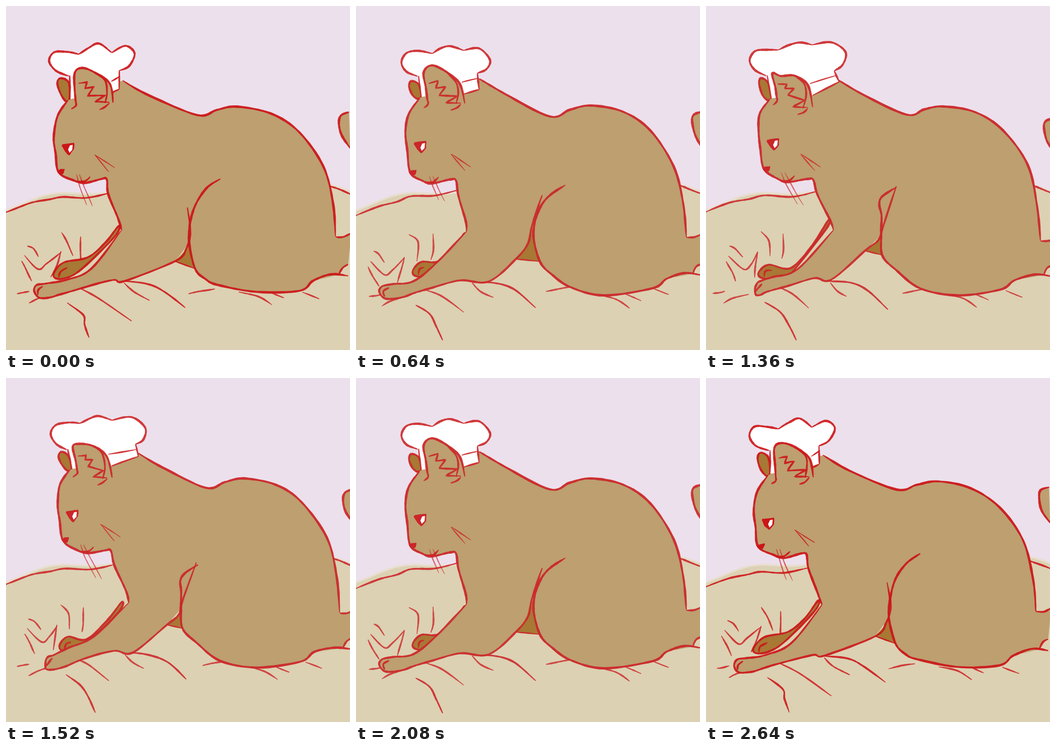
An HTML page for the animation above (2720 ms loop, 748x748 px).

```html
<!DOCTYPE html>
<html lang="en">
<head>
<meta charset="utf-8">
<title>Kneading cat</title>
<style>
html, body { margin: 0; width: 100%; height: 100%; overflow: hidden; background: #ece0ec; }
svg { display: block; width: 100%; height: 100%; }
</style>
</head>
<body>
<svg id="stage" viewBox="0 0 748 748">
  <path fill="#dcd1b3" stroke="#e8decf" stroke-width="4" d="M-5 446C45 430 75 405 130 406C160 408 190 411 222 405L690 386Q725 392 755 406V755H-5Z"/>
  <g id="art"></g>
</svg>
<script>
const STEP = 80, COUNT = 34, HALF = 17;
const FUR = '#bd9f70', DARK = '#a87835', WHITE = '#fff';

// Resting drawing: each part belongs to a group that bends together
const parts = {}, pins = {};
function part(group, name, text) {
  const n = text.split(' ').map(Number), pts = [];
  for (let i = 0; i < n.length; i += 2) pts.push([n[i], n[i + 1]]);
  parts[name] = { group, pts };
}
// A pin: its resting place, then its shift when leaning, rising and pulling
function pin(group, x, y, ...shift) {
  (pins[group] ||= []).push({ x, y, shift });
}

part('body', 'back', '268 158 325 192 422 240 465 226 510 216 580 230 640 270 690 348 712 430 718 502');
part('body', 'tailTop', '718 503 735 503 752 495');
part('body', 'tailUnder', '752 560 740 567 732 582');
part('body', 'tailTip', '753 229 735 236 731 252 737 280 753 308');
part('body', 'seat', '752 585 715 581 675 593 645 614 540 629 465 611 425 583 400 556 387 510 389 470 402 435 425 409 455 389');
pin('body', 268, 158, -14, 4, 18, 2, 18, 2);
pin('body', 422, 240, -7, -3, 8, -3, 15, -4);
pin('body', 510, 216, -6, 3, 15, -1, 5, 2);
pin('body', 640, 270, -2, 5, 0, -3, 6, 0);
pin('body', 690, 348, 0, 0, 7, -3, 9, -3);
pin('body', 718, 502, -1, -1, 7, 4, 9, 8);
pin('body', 740, 567, -8, 2, 0, 3, 2, 3);
pin('body', 735, 250, -7, 2, 0, 8, 4, 14);
pin('body', 645, 614, -7, 5, -5, -2, -5, 3);
pin('body', 540, 629, 5, -7, 5, -2, 10, 0);
pin('body', 465, 611, -5, -5, 3, 1, 0, 3);
pin('body', 400, 556, 12, 16, -14, -12, -17, -14);
pin('body', 387, 510, 11, 5, -8, -8, -6, -12);
pin('body', 455, 389, 11, -13, -33, 25, -42, 5);

part('leg', 'leg', '405 411 382 480 373 518 348 550 288 599 225 597 160 614 125 625 100 633 65 637 51 622 57 609 80 605 125 598 178 556 240 490');
part('leg', 'toe', '62 632 60 620 72 612');
pin('leg', 405, 411, -11, 27, 8, -5, 9, -19);
pin('leg', 380, 480, 19, 12, 2, 2, 3, 0);
pin('leg', 348, 550, 20, 5, 7, -13, -2, -18);
pin('leg', 288, 599, -30, -1, -7, -5, -16, -4);
pin('leg', 225, 597, 7, -1, 10, -6, 10, -5);
pin('leg', 125, 625, -7, 2, -3, 5, 7, -3);
pin('leg', 65, 637, 7, -3, 3, -3, 43, -9);
pin('leg', 51, 622, 10, -2, 13, 0, 56, -8);
pin('leg', 125, 598, 5, -2, 5, -18, 20, -9);
pin('leg', 178, 556, 7, 15, 4, -9, 22, 16);
pin('leg', 240, 490, 12, -3, 18, -4, 37, -3);

part('head', 'front', '240 490 238 465 222 410 217 379 205 377 167 386 145 380 118 363 112 315 107 275 115 235 138 200');
part('head', 'hatL', '134 153 110 143 99 122 110 102 138 98 166 103');
part('head', 'hatM', '166 103 185 92 205 87 234 97');
part('head', 'hatR', '234 97 268 92 291 117 283 138 264 146');
part('head', 'bandSide', '264 146 268 182');
part('head', 'bandLow', '268 182 234 191');
part('head', 'bandMid', '266 157 230 166');
part('head', 'bandLeft', '142 197 136 152');
part('head', 'ear', '157 212 152 180 147 145 165 129 195 142 226 170 237 212');
part('head', 'earInner', '195 142 217 165 222 190 218 213');
part('head', 'earZig', '158 168 178 163 174 178 194 176 181 194 220 196 196 210 228 211');
part('head', 'earCurl', '206 227 218 222 228 213');
part('head', 'earBase', '158 207 156 215 147 221');
part('head', 'farEar', '121 163 115 175 122 192 134 202 142 195 136 170');
part('head', 'eye', '127 298 152 295 151 308 142 319 134 311');
part('head', 'glint', '144 299 150 298 149 309 143 315 140 308');
part('head', 'nose', '116 361 122 358 131 357 128 366 121 368');
part('head', 'mouth', '150 383 168 382 180 372');
pin('head', 99, 122, -5, -2, 1, 0, -4, -4);
pin('head', 166, 103, -8, 2, -2, -5, -8, -8);
pin('head', 205, 87, -2, -5, -5, -4, 0, -8);
pin('head', 234, 97, -4, 4, -4, -3, -3, -12);
pin('head', 291, 117, -11, -14, 12, -5, 12, -17);
pin('head', 265, 146, -18, -5, 20, -2, 15, -5);
pin('head', 268, 182, -22, -1, 18, -10, 22, -17);
pin('head', 134, 153, 3, -1, 0, 2, -3, -1);
pin('head', 165, 129, 0, 6, -10, 2, -3, 23);
pin('head', 226, 170, -1, -2, -11, -7, -4, 3);
pin('head', 157, 212, -5, 3, -2, -9, -2, -7);
pin('head', 215, 210, -3, -2, -9, -2, -7, 10);
pin('head', 119, 172, -3, -7, -1, -4, 0, -7);
pin('head', 138, 200, -3, 5, 2, -8, 0, 3);
pin('head', 107, 275, -3, 8, 4, -10, 7, 0);
pin('head', 140, 307, -5, 4, 2, -12, 6, -6);
pin('head', 118, 362, -4, -2, 3, -16, 8, -8);
pin('head', 167, 386, 3, -1, 8, -11, 13, -3);
pin('head', 217, 379, 2, -1, 6, -8, 16, -1);
pin('head', 232, 440, -1, 0, 13, -2, 23, -3);
pin('head', 240, 490, 12, -3, 18, -4, 37, -3);

part('hair', 'whiskerA', '160 370 168 395 180 422');
part('hair', 'whiskerB', '167 370 178 395 193 424');
part('hair', 'cheekA', '207 322 250 350');
part('hair', 'cheekB', '207 322 237 358');
pin('hair', 163, 370, -7, -4, 0, -12, 4, -8);
pin('hair', 187, 423, -5, 11, 11, 13, 19, 9);
pin('hair', 220, 333, -14, 2, -2, -12, -1, 0);

part('far', 'farArm', '150 588 128 587 124 575 142 556 178 556 212 528 236 494 230 515 170 578');
part('far', 'farToe', '135 585 138 573 148 568');
pin('far', 124, 575, -20, 5, -6, 2, -9, 4);
pin('far', 178, 556, 0, -10, -15, 6, 7, 14);
pin('far', 236, 494, 8, -16, 0, 10, 30, -28);

part('bed', 'bedLeft', '-4 457 50 436 90 425 120 414 170 412 220 401');
part('bed', 'bedRight', '703 390 725 398 752 409');
part('bed', 'fold1', '245 598 300 602 345 617 391 656');
part('bed', 'fold2', '252 602 270 620 299 634');
part('bed', 'fold3', '150 617 185 630 234 666');
part('bed', 'fold4', '130 650 160 670 175 697 188 727');
part('bed', 'stubA', '56 652 75 642 100 634');
part('bed', 'stubB', '28 632 42 630 55 627');
part('bed', 'wrink1', '26 567 38 590 50 610');
part('bed', 'wrink2', '32 555 62 585 80 573 105 548');
part('bed', 'wrink3', '105 546 98 575 90 602');
part('bed', 'wrink4', '115 497 135 512 132 555');
part('bed', 'wrink5', '168 495 168 530 163 552');
part('bed', 'wrink6', '38 533 50 540 62 558');
part('bed', 'right1', '413 621 440 615 468 611');
part('bed', 'right2', '520 625 565 638 595 657');
part('bed', 'right3', '587 627 620 641');
part('bed', 'right4', '645 614 680 627');
pin('bed', 0, 455, 0, -7, 0, -10, 0, -8);
pin('bed', 218, 401, 2, 6, 6, 3, 19, 3);
pin('bed', 391, 656, -1, 0, -3, -10, 5, 4);
pin('bed', 245, 598, 5, 0, -5, -6, 18, 0);
pin('bed', 234, 666, 39, 19, -10, -10, -11, -9);
pin('bed', 188, 727, -7, -6, 5, -3, 8, 0);
pin('bed', 56, 652, -6, -6, 4, -7, -18, -6);
pin('bed', 62, 585, 8, -13, 12, -14, 20, -12);
pin('bed', 105, 548, 15, -13, 5, -11, 7, -12);
pin('bed', 168, 510, -6, 6, 0, 3, 0, 0);
pin('bed', 413, 621, -16, 5, 15, 1, 14, 4);
pin('bed', 595, 657, -17, -7, -3, -4, -6, -2);
pin('bed', 680, 627, 1, 10, 6, -1, 8, 6);
pin('bed', 725, 398, 0, 1, 3, -2, 6, 0);

// Pin weights depend only on the resting places
for (const { group, pts } of Object.values(parts)) {
  for (const p of pts) {
    const w = pins[group].map(q => 1 / (((p[0] - q.x) ** 2 + (p[1] - q.y) ** 2) ** 2 + 1));
    const sum = w.reduce((a, b) => a + b);
    p.shift = [0, 1, 2, 3, 4, 5].map(j => w.reduce((s, v, i) => s + v * pins[group][i].shift[j], 0) / sum);
  }
}

const straight = new Set(['earZig', 'eye', 'glint', 'nose']);
const closed = new Set(['farArm', 'farEar', 'eye', 'nose']);
const art = document.getElementById('art');
const layers = [];

function addPath(color, opacity, make) {
  const el = document.createElementNS('http://www.w3.org/2000/svg', 'path');
  if (color) el.setAttribute('fill', color);
  el.setAttribute('opacity', opacity);
  art.append(el);
  layers.push({ el, make });
}
// A piece is a part name, or [name, from, to] for a run of its points
const fill = (color, ...pieces) => addPath(color, 1, cur => outline(pieces.flatMap(p => {
  const [name, from, to] = [].concat(p);
  return curve(cur[name].slice(from, to), closed.has(name), straight.has(name));
})));
const lines = (width, opacity, names) => names.split(' ').forEach(name => {
  const seed = layers.length * 7.3;
  addPath('', opacity, (cur, pos) =>
    ribbon(curve(cur[name], closed.has(name), straight.has(name)), width, closed.has(name), seed + pos * 2.1));
});

function curve(pts, loop, flat) {
  const n = pts.length, at = i => loop ? pts[(i + n) % n] : pts[Math.max(0, Math.min(n - 1, i))];
  const out = [];
  for (let i = 0; i < (loop ? n : n - 1); i++) {
    const [a, b, c, d] = [at(i - 1), at(i), at(i + 1), at(i + 2)];
    for (let s = 0; s < 8; s++) {
      const t = s / 8;
      out.push([0, 1].map(j => flat ? b[j] + (c[j] - b[j]) * t :
        b[j] + t / 2 * (c[j] - a[j] + t * (2 * a[j] - 5 * b[j] + 4 * c[j] - d[j] + t * (3 * (b[j] - c[j]) + d[j] - a[j])))));
    }
  }
  out.push(at(loop ? 0 : n - 1));
  return out;
}

const outline = pts => 'M' + pts.map(p => p[0].toFixed(1) + ' ' + p[1].toFixed(1)).join('L') + 'Z';

// Crayon-like stroke: uneven width, thinner at the free ends
function ribbon(pts, width, loop, seed) {
  const left = [], right = [], last = pts.length - 1;
  pts.forEach(([x, y], i) => {
    const a = pts[Math.max(0, i - 1)], b = pts[Math.min(last, i + 1)];
    const dx = b[0] - a[0], dy = b[1] - a[1], len = Math.hypot(dx, dy) || 1;
    const taper = loop ? 1 : Math.min(1, 0.45 + Math.min(i, last - i) / 8);
    const rough = 1 + 0.14 * Math.sin(i * 0.55 + seed) + 0.08 * Math.sin(i * 2.3 + seed * 3);
    const drift = 0.4 * Math.sin(i * 0.37 + seed * 2), half = width / 2 * taper * rough;
    const nx = -dy / len, ny = dx / len;
    left.push([x + nx * (drift + half), y + ny * (drift + half)]);
    right.unshift([x + nx * (drift - half), y + ny * (drift - half)]);
  });
  return outline(left.concat(right));
}

lines(4, 0.88, 'bedLeft bedRight fold1 fold4');
lines(3.6, 0.8, 'fold2 fold3 stubA stubB wrink1 wrink2 wrink3 wrink4 wrink5 wrink6 right1 right2 right3 right4');
fill(FUR, 'tailTip');
lines(5, 0.9, 'tailTip');
fill(DARK, 'farEar');
lines(4.4, 0.92, 'farEar');
fill(DARK, 'farArm');
lines(4.2, 0.92, 'farArm farToe');
fill(FUR, 'back', 'tailTop', 'tailUnder', ['seat', 2, 9], ['leg', 3], 'front');
fill(DARK, ['leg', 1, 4], ['seat', 7, 9]);
addPath('', 0.9, cur => ribbon(curve([cur.leg[3], cur.seat[7]]), 3.6, false, 1));
lines(4.8, 0.93, 'back seat front');
lines(4.3, 0.9, 'tailTop tailUnder leg toe');
fill(WHITE, 'hatL', 'hatM', 'hatR', 'bandSide', 'bandLow', 'bandLeft');
lines(4.6, 0.9, 'hatL hatM hatR bandSide bandLow bandLeft');
lines(3.6, 0.9, 'bandMid');
fill(FUR, 'ear');
lines(4.8, 0.92, 'ear');
lines(3.9, 0.9, 'earInner earZig earCurl earBase');
fill('', 'eye');
lines(3.2, 1, 'eye');
fill(WHITE, 'glint');
fill('', 'nose');
lines(2, 1, 'nose');
lines(3.8, 0.95, 'mouth');
lines(2.4, 0.65, 'whiskerA whiskerB');
lines(2.8, 0.8, 'cheekA cheekB');

// Linear steps between [position, value] pairs
function ramp(pos, ...stops) {
  let i = 0;
  while (i < stops.length - 2 && pos >= stops[i + 1][0]) i++;
  const [[p, a], [q, b]] = [stops[i], stops[i + 1]];
  return a + (b - a) * Math.max(0, Math.min(1, (pos - p) / (q - p)));
}

function draw(frame) {
  // The drawings run forward, then back
  const pos = frame <= HALF ? frame : COUNT - frame;
  const lean = ramp(pos, [1, 1], [8, 0]);
  const rise = ramp(pos, [8, 0], [12, 0.65], [13, 1], [17, 0]);
  const pull = ramp(pos, [13, 0], [17, 1]);
  const bob = ramp(pos, [0, 0], [1, 4], [8, 0]);
  const cur = {};
  for (const name in parts) {
    cur[name] = parts[name].pts.map(p => [0, 1].map(j =>
      p[j] + lean * p.shift[j] + rise * p.shift[j + 2] + pull * p.shift[j + 4] + j * bob));
  }
  art.setAttribute('fill', `rgb(204 ${Math.round(38 - 16 * lean)} ${Math.round(41 - 17 * lean)})`);
  art.setAttribute('transform', `translate(0 ${frame > HALF ? 2 : 0})`);
  for (const { el, make } of layers) el.setAttribute('d', make(cur, pos));
}

let shown = -1;
const start = performance.now();
function tick() {
  const frame = Math.floor((performance.now() - start) / STEP) % COUNT;
  if (frame !== shown) draw(shown = frame);
  requestAnimationFrame(tick);
}
tick();
</script>
</body>
</html>
```
